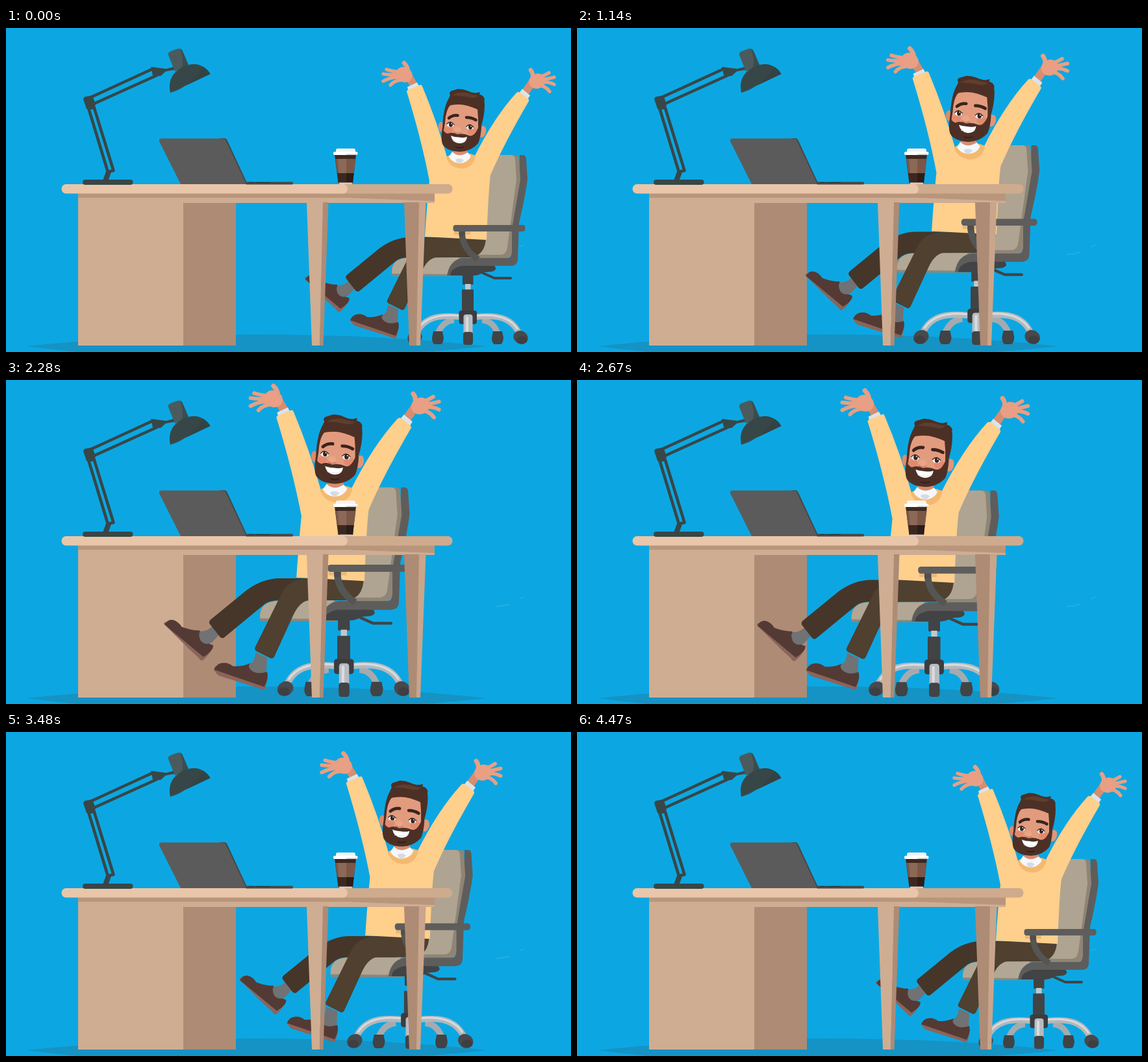
Animation, 870 px wide and 500 px high, one loop 4.5 s. Source, as an HTML page with a canvas:

```html
<!DOCTYPE html>
<html lang="en">
<head>
<meta charset="utf-8">
<title>Happy desk</title>
<style>
html, body { margin: 0; width: 100%; height: 100%; overflow: hidden; background: #0ca7e2; }
canvas { display: block; width: 870px; height: 500px; }
</style>
</head>
<body>
<canvas id="stage" width="870" height="500"></canvas>
<script>
const ctx = document.getElementById('stage').getContext('2d');
const LOOP = 4500, STEP = 30, TURN = 2310, END = 4470;
const SKIN = '#e89f83', SKIN_DARK = '#d78d70', HAIR = '#4c3026', STEEL = '#374748';
const WOOD = '#cfad92', WOOD_DARK = '#ae8b75', FRAME = '#5e5d5c', DARK = '#414345';

function fill(color, d) {
  ctx.fillStyle = color;
  ctx.fill(new Path2D(d));
}
function line(color, width, d, cap = 'round') {
  ctx.strokeStyle = color;
  ctx.lineWidth = width;
  ctx.lineCap = cap;
  ctx.lineJoin = 'round';
  ctx.stroke(new Path2D(d));
}
function oval(color, x, y, rx, ry, turn = 0) {
  ctx.fillStyle = color;
  ctx.beginPath();
  ctx.ellipse(x, y, rx, ry, turn, 0, Math.PI * 2);
  ctx.fill();
}
function box(color, x, y, w, h, r = 0) {
  ctx.fillStyle = color;
  ctx.beginPath();
  ctx.roundRect(x, y, w, h, r);
  ctx.fill();
}

function drawBackdrop() {
  box('#0ca7e2', 0, 0, 870, 500);
  fill('#1593c4', 'M33 491Q200 473 388 473T741 491Q700 496 640 500H110Q60 495 33 491Z');
  line('#35b5e4', 1, 'M755 349.5Q766 349 775 346M792 337.5L798 334.5');
  box(WOOD, 111, 260, 163, 230);
  box(WOOD_DARK, 273, 265, 81, 225);
}

function drawLamp() {
  box(STEEL, 118, 234, 77.5, 8, 4);
  line(STEEL, 8, 'M153 236L158 222', 'butt');
  line(STEEL, 4.6, 'M126 120L156.5 221M134.5 119L165.5 220M156.5 222L165.5 220');
  line(STEEL, 4.6, 'M125 109.5L226 63M134 117.5L239 70');
  fill(STEEL, 'M119 110Q119 107 122 106L133 104L138 118L133 126L124 125Z');
  fill(STEEL, 'M223 60L247 63L260 59.5V64.5L246 67L238 74L226 73Z');
  fill('#4b5b5d', 'M250 42Q249 38 253 36L264 32Q270 31 272 36L281 57L260 67Z');
  fill('#3d4d4f', 'M272 36L281 57L270 62Q275 51 268 32Q271 33 272 36Z');
  fill(STEEL, 'M253 100Q248 76 267 63Q297 45 314.5 71Z');
  fill('#334345', 'M253 100Q284 91 304 60Q311 64 314.5 71Z');
}

function drawLaptop() {
  fill('#484848', 'M330 170H336Q339 170 341 174L372 241H360Z');
  fill('#5b5b5b', 'M240 170.5H334Q337 170.5 338.5 174L370 241H269L236.5 176Q234 170.5 240 170.5Z');
  box('#47484b', 369, 237.5, 73, 4, 1.5);
  line('#2d3035', 1, 'M374 238.5H381M385 238.5H406');
}

function drawCup() {
  fill('#3c2820', 'M506 195H539L534 239H511.5Z');
  fill('#7a5748', 'M507 202H538.5L535.5 224H510Z');
  fill('#8c6857', 'M511 202H524V224H513Z');
  fill('#2b1d18', 'M524 224H535.5L534 239H524Z');
  box('#d9cec7', 513, 238.5, 20, 2.5, 1);
  box('#f5f4f2', 508, 186, 30, 8, 3);
  box('#ffffff', 504, 191, 37.5, 5, 2);
  box('#d8d9db', 524, 194, 17, 2, 1);
}

function drawDesk() {
  box(WOOD, 111, 254, 549, 16, 1);
  fill('#b9967b', 'M111 255H660V267L525 262H111Z');
  fill(WOOD, 'M463 269H489L483 490H471Z');
  fill(WOOD_DARK, 'M488 269H496.5L488.5 490H483Z');
  fill(WOOD_DARK, 'M613 269H637L633 490H621Z');
  fill('#c9a58c', 'M636 269H646.5L638 490H632Z');
  box('#cfab8e', 480, 241, 207.5, 14.5, 7);
  box('#e9c6aa', 85.5, 241, 440.5, 14.5, 7);
}

function drawChairBase() {
  line(DARK, 4, 'M734 378L752 386H777');
  line('#a6aaae', 9, 'M690 451Q673 452 665 471M733 451Q750 452 757 471', 'butt');
  line('#b3b7bb', 9, 'M700 446C667 442 644 446 632 471M722 446C755 442 778 446 790 471', 'butt');
  line('#d7dadd', 3, 'M697 444C668 441 646 446 634 465M725 444C754 441 776 446 788 465', 'butt');
  for (const x of [665, 757]) fill(DARK, `M${x - 7} 468H${x + 7}L${x + 9} 478Q${x + 8} 488 ${x + 4} 488H${x - 5}Q${x - 9} 486 ${x - 9} 478Z`);
  for (const side of [-1, 1]) {
    const x = 711 + side * 81.5;
    oval('#47494c', x, 477.5, 11.5, 10, side * 0.5);
    oval('#3d3f42', x + side * 2, 481.5, 8, 6);
  }
  box(DARK, 703, 378, 16.5, 18, 1);
  box('#c3c7ca', 707, 395, 8.5, 10);
  box(DARK, 702, 403.5, 18, 36, 1);
  box('#3b3c3f', 697.5, 436, 27.5, 21, 4);
  box('#b8bcc0', 704.5, 442, 14, 32, 4);
  box('#d9dcde', 708, 445, 4, 25, 2);
  box(DARK, 704, 469, 15, 20, 4);
}

function drawChair() {
  fill(FRAME, 'M791 196H797Q801 197 801 203L803 233Q800 258 790 301L788 358Q787 367 777 367H705V355H773Q778 355 778 349V302Q786 260 790 235Z');
  fill('#8f8576', 'M720 196H783Q790 196 790 203L792 234L779 310V346Q778 355 770 355H715Z');
  fill('#aea491', 'M720 196H777Q784 196 784 203L786 234L772 338Q771 349 762 350H715Z');
  fill('#8f8676', 'M594 377Q593 358 614 356L700 355V383H596Q594 383 594 377Z');
  fill('#b2a794', 'M594 379Q593 358 614 355L698 354L681 380Z');
}

function drawArmrest() {
  fill(FRAME, 'M679 382Q683 358 703 355H779V367H745Q719 370 712 382Z');
  fill(DARK, 'M684 382Q684 371 702 367H752Q758 373 748 376L735 377Q729 382 719 382Z');
  fill('#e7b978', 'M690 313H715V319H690Z');
  line('#555554', 9.5, 'M702 312Q701 340 727 357', 'butt');
  box(FRAME, 688.5, 304, 111, 10, 4);
  box('#4e4e4e', 698, 314, 9, 7);
}

function drawShoe(body, sole) {
  fill('#8b645a', sole);
  fill('#543a34', body);
}

function drawLegs() {
  drawShoe(
    'M461 388Q464 381 471 381Q479 382 485 391Q498 396 510 396L514 411L529 417Q529 425 515 433Z',
    'M460 387Q460 383 465 385L527 422Q522 432 514 438Q511 439 508 434L495 422Z');
  fill('#707274', 'M528 390L537 402L527 413Q517 418 511 410Q507 401 511 397Q520 398 528 390Z');
  fill('#453629', 'M692 323H622Q598 323 575 340L525 381Q522 384 524 387L538 405Q541 408 544 406L601 359Q608 354 622 354H690Z');
  drawShoe(
    'M530 451Q533 442 543 441.5Q550 441 556 446Q569 447 580 442L585 453L604 454Q607 462 600 475Z',
    'M530 452Q529 448 536 449L604 466L602 475Q600 481 596 478L536 459Z');
  fill('#707274', 'M588 427L604 434L603 454Q588 459 580 450Q577 445 580 443Q587 440 588 427Z');
  fill('#4f4030', 'M739 323H661Q637 324 626 341L587 420Q586 423 589 425L609 435Q612 436 614 433L640 376Q649 356 662 354H714Q738 352 739 323Z');
}

function drawHand(palmX, palmY, tilt, wrist, thumb, fingers) {
  line(SKIN_DARK, 12, wrist, 'butt');
  line(SKIN, 6.5, thumb);
  line(SKIN, 5.3, fingers);
  oval(SKIN, palmX, palmY, 13, 11.5, tilt);
}

function drawBody() {
  drawHand(613, 72, 0.5, 'M618 71L629 90',
    'M619 67Q619 60 613 54',
    'M607 68Q595 67 586 64M605 71Q593 73 581 71M606 76Q594 75 581 82M611 80Q599 80 592 88');
  drawHand(818, 82, -0.4, 'M811 83L798 101',
    'M811 77Q812 70 808 65',
    'M820 77Q830 73 836 69M823 80Q833 79 844 76M823 84Q834 82 844 87M817 88Q830 88 837 98');
  fill('#dce3ea', 'M618 91L633 84L637 92L620 99ZM795 94L807 104L802 112L788 103Z');
  fill('#ffcf8c', 'M617 98Q617 96 620 95L637 88Q640 87 641 90Q664 145 679 199L721 199Q752 137 786 100Q788 98 791 99L804 109Q806 111 805 113Q767 178 746 227Q743 248 740 327L645 322Q648 275 652 236Q640 173 617 98Z');
  fill('#f4b96f', 'M678 199L687 194H715L723 197Q720 216 701 217Q682 215 678 199Z');
  fill(SKIN_DARK, 'M689 181H709L712 199Q699 208 687 199Z');
  fill('#f5f7fa', 'M687 191Q697 201 711 192L716 198Q711 208 699 209Q687 208 682 199Z');
  fill('#d5dbe3', 'M692 203Q699 199 705 204L700 209Q694 209 692 203Z');
}

function drawEye(x, y) {
  oval('#ffffff', x, y, 5.6, 4, 0.1);
  oval('#352420', x + 0.5, y, 3, 3.7);
  oval('#ffffff', x + 1.7, y - 1.5, 0.9, 0.9);
  line('#3a241e', 1.3, `M${x - 5.5} ${y - 1}Q${x} ${y - 7} ${x + 5.5} ${y}`);
}

function drawHead() {
  oval('#d98b70', 670.5, 153, 4.8, 8, -0.1);
  oval('#e09679', 733.5, 160, 5.5, 9, 0.25);
  fill(HAIR, 'M672 156Q673 126 680 112L684 104L731 103Q737 106 737 119Q737 135 731 154L728 165H675Z');
  fill('#e39b7e', 'M676 146Q677 126 685 118Q708 115 726 125L727 139L727 171Q713 185 697 184Q676 178 674 159Z');
  fill(HAIR, 'M679 121Q687 109 683 101Q683 98 686 97L696 94Q704 94 711 97Q720 101 725 100L730 99L729 103Q735 103 737 110L729 127Q710 118 697 118Q686 118 679 121Z');
  fill('#5f3e2d', 'M687 104Q698 97 713 101Q721 104 727 104Q724 109 713 107Q700 104 687 104Z');
  oval('#e18a70', 681, 158, 7, 5.5);
  oval('#e18a70', 719, 160, 8, 5.5);
  drawEye(684.5, 149);
  drawEye(714.5, 153);
  line('#3a241e', 4.5, 'M682 139Q688 134 695.5 135M709 138Q717 138 723.5 142');
  fill(HAIR, 'M672 153Q674 162 680 163Q688 160 695 164Q704 162 713 166Q722 169 729 149L732 153Q731 169 727 178Q717 190 699 191Q678 190 672 179Q669 170 672 153Z');
  oval('#eaa587', 695, 157.5, 5.5, 5.5);
  line('#c9795f', 1.3, 'M690 160Q694 164 700 161');
  fill('#ffffff', 'M685 166Q689 168 697 168.5Q705 170 710 168Q709 178 698 178Q687 177 685 166Z');
  line('#dcdcdc', 0.7, 'M688 174Q698 177 708 174');
  line('#382119', 2, 'M693 184Q698 186 704 184');
}

function drawWorker(progress) {
  const scale = 1 + 0.1043 * progress;
  ctx.save();
  ctx.translate(711 - 193.5 * progress, 489);
  ctx.scale(scale, scale);
  ctx.translate(-711, -489);
  drawChairBase();
  drawChair();
  drawLegs();
  drawBody();
  drawHead();
  drawArmrest();
  ctx.restore();
}

function draw(now) {
  const t = Math.floor((now % LOOP) / STEP) * STEP;
  const progress = t < TURN ? t / TURN : (END - t) / (END - TURN);
  drawBackdrop();
  drawWorker(progress);
  drawDesk();
  drawLamp();
  drawLaptop();
  drawCup();
}

const start = performance.now();
function tick() {
  draw(performance.now() - start);
  requestAnimationFrame(tick);
}
tick();
</script>
</body>
</html>
```
